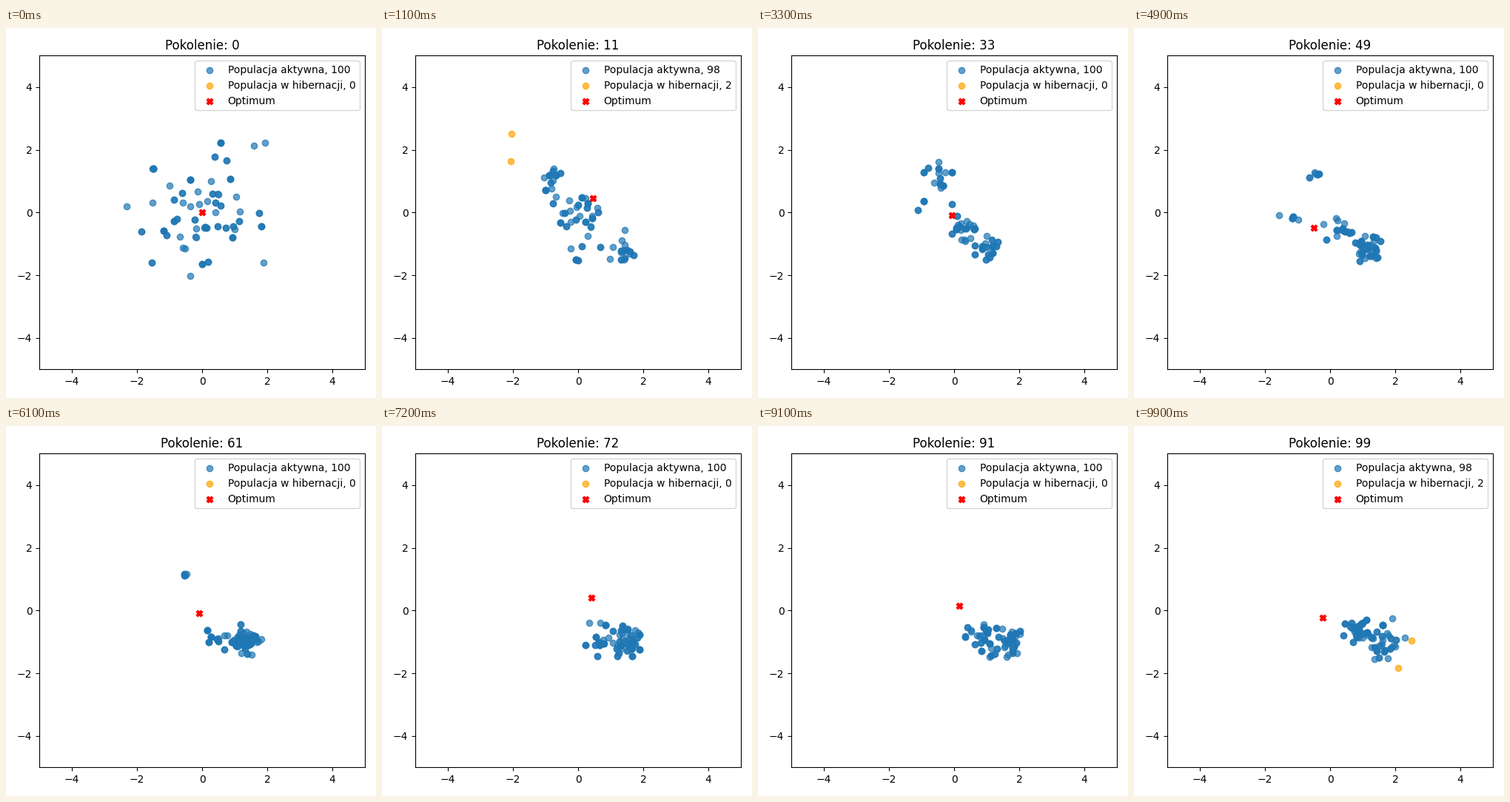
These frames come from a looping animation (500 by 500 pixels, 10000 ms). A matplotlib script:

```python
import numpy as np
import matplotlib.pyplot as plt
from matplotlib.animation import FuncAnimation

GENERATIONS = 100
SIZE = 100
FAMILIES = 80
LIFE = 4

# Niches drift through: generation, x, y, spread, share of the population.
# All of them start as one wide cloud around the origin.
START = (0, 0, 0, 1.05, 20)
NICHES = [
    [START, (9, -.8, 1.05, .26, 24), (33, -.35, 1.15, .24, 22),
     (49, -.4, 1.2, .1, 8), (61, -.57, 1.13, .06, 8), (64, -.57, 1.13, .06, 0)],
    [START, (9, -.4, .1, .25, 14), (33, -.9, .2, .5, 12),
     (49, -1.1, -.2, .25, 7), (53, -1.1, -.2, .25, 0)],
    [START, (9, .12, 0, .25, 30), (33, .35, -.65, .22, 35), (49, .35, -.5, .26, 30),
     (61, .65, -.85, .25, 20), (82, 1, -.85, .3, 45), (99, .8, -.65, .24, 55)],
    [START, (9, 1.4, -1.2, .2, 25), (33, .85, -1.15, .22, 30), (49, 1.15, -1.15, .22, 55),
     (61, 1.3, -.97, .24, 72), (82, 1.8, -1.1, .25, 55), (99, 1.65, -.95, .32, 45)],
    [START, (9, .05, -1.5, .2, 7), (20, .05, -1.5, .2, 0)],
]

# first generation, last generation, x, y
SLEEPERS = [(4, 15, -2.05, 2.5), (7, 18, -2.07, 1.63),
            (93, 99, 2.09, -1.83), (96, 99, 2.5, -.96)]

rng = np.random.default_rng(11)
family = np.sort(rng.integers(FAMILIES, size=SIZE))
phase = rng.integers(LIFE, size=FAMILIES)
offsets = rng.normal(size=(GENERATIONS, FAMILIES, 2)).clip(-2.2, 2.2)


def niche_state(keys, gens):
    """Rows x, y, spread and share of a niche at the given generations."""
    t, *columns = np.array(keys).T
    return [np.interp(gens, t, column) for column in columns]


def population(gen):
    """Each family stays where it was born until its offspring replace it."""
    ids = np.arange(FAMILIES)
    born = np.maximum(gen - (gen + phase) % LIFE, 0)
    states = np.array([niche_state(keys, born) for keys in NICHES])
    share = states[:, 3].cumsum(axis=0)
    rank = (ids + 0.5) / FAMILIES
    niche = (rank > share / share[-1]).sum(axis=0)
    x, y, spread, _ = states[niche, :, ids].T
    points = np.column_stack([x, y]) + spread[:, None] * offsets[born, ids]
    return points[family]


def asleep(gen):
    pts = [(x, y) for start, end, x, y in SLEEPERS if start <= gen <= end]
    return np.array(pts).reshape(-1, 2)


fig, ax = plt.subplots(figsize=(5, 5), dpi=100)
active = ax.scatter([], [], color="tab:blue", alpha=0.7, label="Populacja aktywna, 100")
hibernated = ax.scatter([], [], color="orange", alpha=0.7, label="Populacja w hibernacji, 0")
optimum = ax.scatter([0], [0], color="red", marker="X", label="Optimum")
ax.set(xlim=(-5, 5), ylim=(-5, 5), title="Pokolenie: 0")
labels = ax.legend(loc="upper right").get_texts()
fig.tight_layout()


def update(gen):
    sleeping = asleep(gen)
    n = len(sleeping)
    awake = population(gen)[:SIZE - n]
    active.set_offsets(awake)
    hibernated.set_offsets(sleeping)
    optimum.set_offsets([[0.5 * np.sin(0.1 * gen)] * 2])
    labels[0].set_text(f"Populacja aktywna, {len(awake)}")
    labels[1].set_text(f"Populacja w hibernacji, {n}")
    ax.set_title(f"Pokolenie: {gen}")
    return active, hibernated, optimum


anim = FuncAnimation(fig, update, frames=GENERATIONS, interval=100, repeat=True, blit=False)
plt.show()
```
